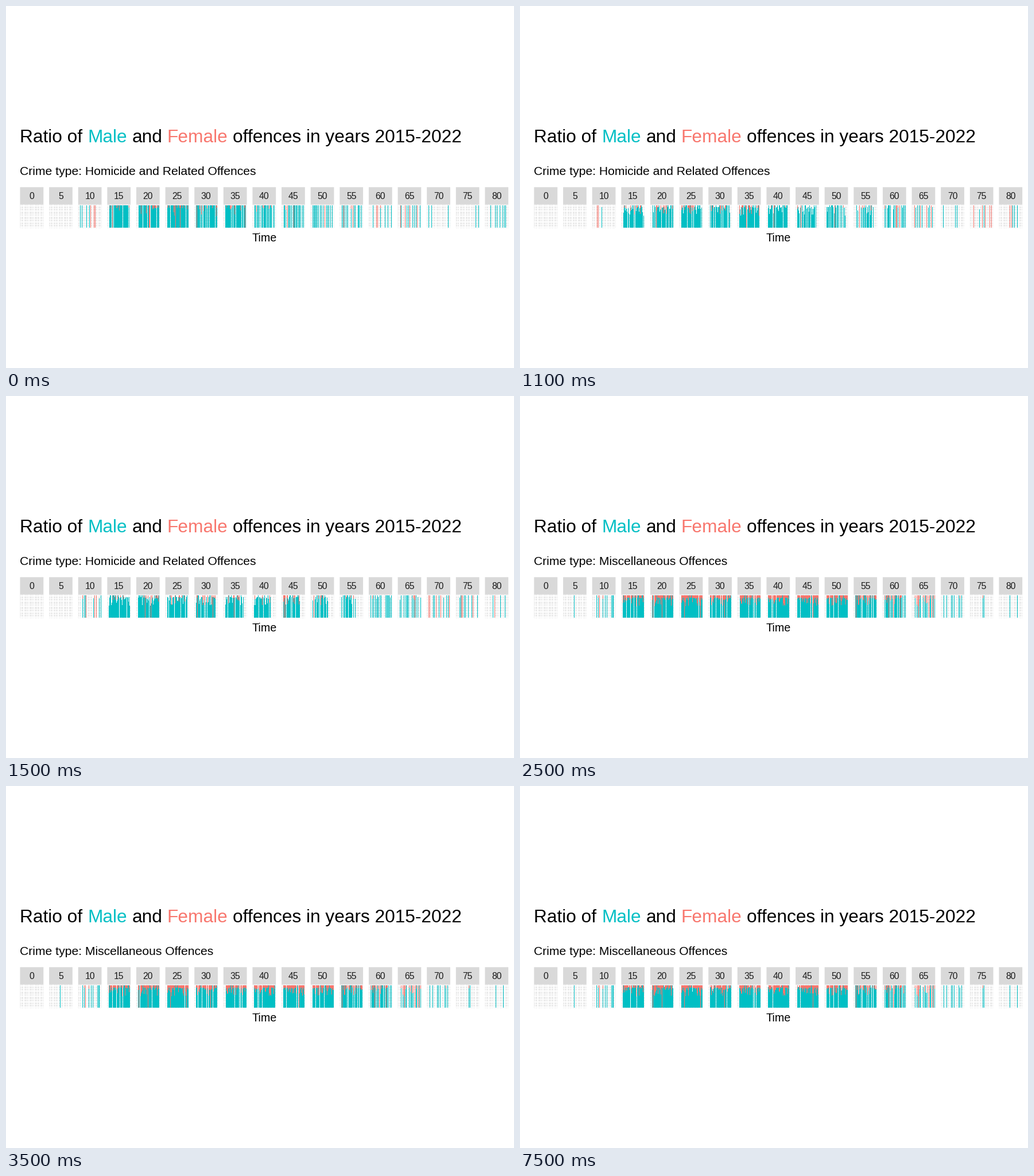
Animation, 885 px wide and 632 px high, one loop 8000 ms. Source, as a matplotlib script:

```python
import matplotlib.pyplot as plt
import numpy as np
from matplotlib.animation import FuncAnimation
from matplotlib.patches import Rectangle

W, H, DPI = 885, 632, 100
PX = 72 / DPI
MALE, FEMALE = "#00BFC4", "#F8766D"
LEFT, PANEL_W, PITCH = 24.5, 40.72, 50.62
STRIP_TOP, PANEL_TOP, PANEL_BOTTOM = 316.3, 346.7, 387.7
BAR_TOP, BAR_BOTTOM = 348, 386
BAR_SPAN = 38
GOLDEN = (5 ** 0.5 - 1) / 2
AGES = range(0, 85, 5)

plt.rcParams["font.family"] = "Liberation Sans"
fig = plt.figure(figsize=(W / DPI, H / DPI), dpi=DPI, facecolor="white")
ax = fig.add_axes([0, 0, 1, 1])
ax.set(xlim=(0, W), ylim=(H, 0))
ax.axis("off")


def label(x, y, text, size, color="black", ha="left"):
    return ax.text(x, y, text, fontsize=size * PX, color=color, ha=ha, va="baseline")


def box(x, top, bottom, color):
    ax.add_patch(Rectangle((x, top), PANEL_W, bottom - top, fc=color, lw=0, snap=False))


def panel_left(age):
    return LEFT + PITCH * age / 5


def draw_panel(age):
    x = panel_left(age)
    box(x, STRIP_TOP, PANEL_TOP, "#D9D9D9")
    box(x, PANEL_TOP, PANEL_BOTTOM, "#EBEBEB")
    pad_x, pad_y = PANEL_W / 22, (PANEL_BOTTOM - PANEL_TOP) / 22
    grid_x = np.linspace(x + pad_x, x + PANEL_W - pad_x, 9)
    grid_y = np.linspace(PANEL_TOP + pad_y, PANEL_BOTTOM - pad_y, 9)
    for i, (gx, gy) in enumerate(zip(grid_x, grid_y)):
        thin, thick = 0.96 * PX, 1.92 * PX
        ax.vlines(gx, PANEL_TOP, PANEL_BOTTOM, color="white", lw=thick if i % 2 else thin)
        ax.hlines(gy, x, x + PANEL_W, color="white", lw=thin if i % 2 else thick)
    label(x + PANEL_W / 2, 337, str(age), 15.8, "#1A1A1A", "center")


def step(value):
    return 1 / (1 + np.exp(-value))


def panel_bars(age, seed, peak, rise, fall, floor, caps, gaps, taper):
    """Columns of one age group: men below, women or an empty gap above."""
    rng = np.random.default_rng(seed * 100 + age)
    (young, young_width), (old, old_width) = rise, fall
    share = step((age - young) / young_width)
    share *= floor + (1 - floor) * step((old - age) / old_width)
    women_only = 0.03 + 0.35 * (1 - share) ** 2
    end = BAR_SPAN - (taper * max(age - 20, 0) if age < 60 else 0)
    start, phase = round(panel_left(age)) + 2, rng.random()
    male, female = [], []
    for i in range(round(end) - 1):
        jitter, kind, top, size = rng.random(4)
        if (phase + i * GOLDEN + 0.4 * jitter) % 1 > peak * share:
            continue
        x, cut = start + i, BAR_TOP
        if kind < women_only:
            cut = BAR_BOTTOM
        elif top < (caps + gaps) * share:
            cut += round(BAR_SPAN * (0.08 + 0.4 * size ** 3))
        if kind < women_only or top < caps * share:
            female.append((x, BAR_TOP, cut))
        male.append((x, cut, BAR_BOTTOM))
    return male, female


def columns(bars, color):
    x, top, bottom = np.array([bar for bar in bars if bar[1] < bar[2]]).T
    return ax.vlines(x + 0.5, top, bottom, color=color, lw=PX, antialiased=False, zorder=3)


def build_scene(crime, **look):
    male, female = [], []
    for age in AGES:
        men, women = panel_bars(age, **look)
        male += men
        female += women
    return [label(24.5, 295, f"Crime type: {crime}", 21.2),
            columns(male, MALE), columns(female, FEMALE)]


for x, text, color in [(24.5, "Ratio of", "black"), (142, "Male", MALE),
                       (219.5, "and", "black"), (280.8, "Female", FEMALE),
                       (395, "offences in years 2015-2022", "black")]:
    label(x, 238, text, 31.7, color)
for age in AGES:
    draw_panel(age)
label(449.8, 411, "Time", 19.8, ha="center")

# rise and fall: (age of the half-way point, width) of the activity curve
homicide = dict(crime="Homicide and Related Offences", rise=(11.5, 1), floor=0.17)
misc = dict(crime="Miscellaneous Offences", rise=(11, 1.8), fall=(65, 5), floor=0, seed=4, taper=0)
scenes = [
    build_scene(**homicide, seed=1, peak=0.88, fall=(47, 7), caps=0.25, gaps=0, taper=0),
    build_scene(**homicide, seed=2, peak=0.85, fall=(57, 6), caps=0.25, gaps=0.5, taper=0.13),
    build_scene(**homicide, seed=3, peak=0.9, fall=(59, 5), caps=0.25, gaps=0.55, taper=0.33),
    build_scene(**misc, peak=0.92, caps=0.9, gaps=0),
    build_scene(**misc, peak=0.95, caps=0.8, gaps=0.1),
]
TIMELINE = [0] + [1] * 2 + [2] * 2 + [3] * 10 + [4]


def update(frame):
    for i, artists in enumerate(scenes):
        for artist in artists:
            artist.set_visible(i == TIMELINE[frame])
    return []


anim = FuncAnimation(fig, update, frames=len(TIMELINE), interval=500, repeat=True, repeat_delay=0)
plt.show()
```
